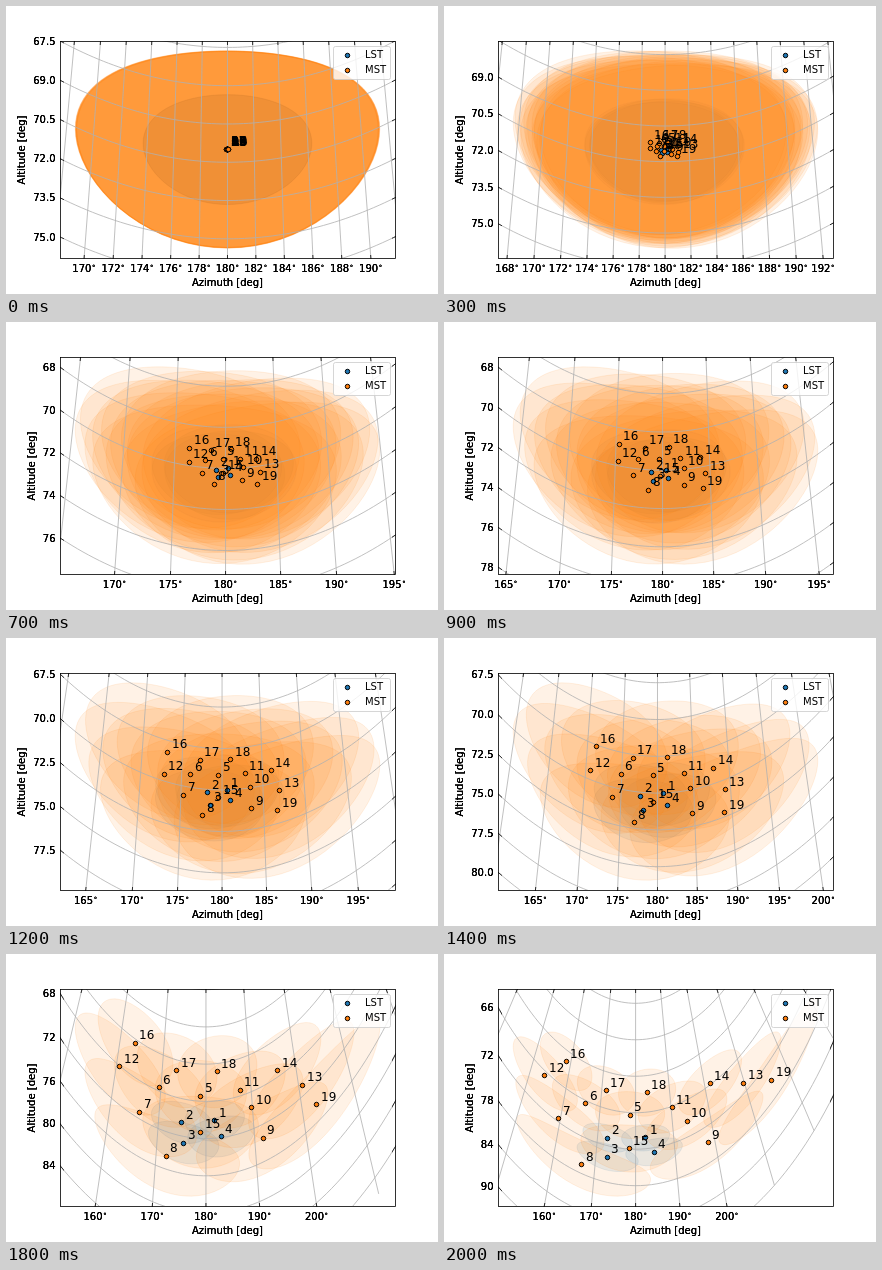
An HTML page with a canvas that plays this animation: 432 by 288 pixels, repeating every 2100 ms.

```html
<!DOCTYPE html>
<html>
<head>
<meta charset="utf-8">
<style>
html, body { margin: 0; width: 100%; height: 100%; overflow: hidden; background: #fff; }
canvas { display: block; }
</style>
</head>
<body>
<canvas id="stage" width="432" height="288"></canvas>
<script>
const ctx = document.getElementById('stage').getContext('2d');
const LEFT = 54, RIGHT = 389, TOP = 35, BOTTOM = 252, STEP_MS = 100;
const RAD = Math.PI / 180, POINTING = 70 * RAD;
const BLUE = '#1f77b4', ORANGE = '#ff7f0e';
const FONT = '"DejaVu Sans", sans-serif';

// Divergence (in thousandths) at each step
const DIVERGENCE = [.1, .5, 1, 2, 3, 4, 5, 6, 7, 8, 9, 10, 12.2, 14, 16, 18, 20, 27.5, 35, 42.5, 50];

// Telescope ground offsets [along azimuth 180, across], scaled to the largest divergence
const OFFSETS = [
  [-.004, .0157], [-.0169, -.0422], [-.0722, -.0336], [-.0507, .0242],
  [.0681, -.0111], [.0547, -.0991], [-.0464, -.1099], [-.1229, -.0512],
  [-.0988, .0809], [.0002, .0852], [.0651, .0743], [.02, -.1781],
  [-.0531, .1654], [.0497, .1553], [-.0355, -.009], [.1259, -.1833],
  [.1293, -.0725], [.14, .0288], [-.1386, .1478]
];

// Polar plane: radius is the altitude, az is measured from 180 degrees
const polar = (az, alt) => [alt * Math.sin(az * RAD), alt * Math.cos(az * RAD)];

// Circle of angular radius r on the sky around (az, alt), all in radians
function skyCircle(az, alt, r) {
  const points = [];
  for (let a = 0; a < 360; a += 4) {
    const sinAlt = Math.sin(alt) * Math.cos(r) + Math.cos(alt) * Math.sin(r) * Math.cos(a * RAD);
    const turn = Math.atan2(Math.sin(a * RAD) * Math.sin(r) * Math.cos(alt),
                            Math.cos(r) - Math.sin(alt) * sinAlt);
    points.push(polar((az + turn) / RAD, Math.asin(sinAlt) / RAD));
  }
  return points;
}

function telescope([along, across], i, spread) {
  const u = Math.cos(POINTING) + spread * along, v = spread * across;
  const alt = Math.atan2(Math.sin(POINTING), Math.hypot(u, v));
  const az = Math.atan2(v, u);
  const isLst = i < 4;
  return {
    at: polar(az / RAD, alt / RAD),
    field: skyCircle(az, alt, (isLst ? 2.15 : 3.85) * RAD),
    color: isLst ? BLUE : ORANGE
  };
}

function limits(values) {
  const lo = Math.min(...values), hi = Math.max(...values), pad = .05 * (hi - lo);
  return [lo - pad, hi + pad];
}

function multiples(lo, hi, step) {
  const out = [];
  for (let v = Math.ceil(lo / step) * step; v <= hi; v += step) out.push(v);
  return out;
}

function trace(points, toPx) {
  ctx.beginPath();
  points.forEach(p => ctx.lineTo(...toPx(p)));
}

function text(str, x, y, size, align = 'left', passes = 1) {
  ctx.font = size + 'px ' + FONT;
  ctx.textAlign = align;
  ctx.fillStyle = '#000';
  while (passes--) ctx.fillText(str, x, y);
}

// Number with a small raised ring as the degree sign
function degrees(n, x, y) {
  text(n, x - 2.2, y, 10, 'center', 3);
  text('∘', x + 7.4, y - 4, 7, 'left', 3);
}

// Markers sit on pixel centres
function dot(x, y, color) {
  ctx.beginPath();
  ctx.arc(Math.floor(x) + .5, Math.floor(y) + .5, 2.24, 0, 7);
  ctx.fillStyle = color;
  ctx.strokeStyle = '#000';
  ctx.lineWidth = 1;
  ctx.fill();
  ctx.stroke();
}

function clipped(rects, paint) {
  ctx.save();
  ctx.beginPath();
  rects.forEach(r => ctx.rect(...r));
  ctx.clip();
  paint();
  ctx.restore();
}

function strokeAll(lines, toPx, color) {
  ctx.strokeStyle = color;
  ctx.lineWidth = .8;
  lines.forEach(line => { trace(line, toPx); ctx.stroke(); });
}

function legend() {
  ctx.beginPath();
  ctx.roundRect(327.5, 40.5, 57, 33, 2);
  ctx.fillStyle = 'rgba(255,255,255,.8)';
  ctx.strokeStyle = 'rgba(204,204,204,.8)';
  ctx.lineWidth = 1;
  ctx.fill();
  ctx.stroke();
  [['LST', BLUE, 49], ['MST', ORANGE, 64]].forEach(([name, color, y]) => {
    dot(341, y, color);
    text(name, 359, y + 3, 10);
  });
}

function draw(step) {
  const spread = DIVERGENCE[step] / 50;
  const tels = OFFSETS.map((o, i) => telescope(o, i, spread));
  const edge = tels.flatMap(t => t.field);
  const [x0, x1] = limits(edge.map(p => p[0]));
  const [y0, y1] = limits(edge.map(p => p[1]));
  const W = RIGHT - LEFT, H = BOTTOM - TOP;
  const toPx = ([x, y]) => [LEFT + (x - x0) / (x1 - x0) * W, TOP + (y - y0) / (y1 - y0) * H];

  // Grid ranges and steps
  const far = Math.max(Math.hypot(x0, y1), Math.hypot(x1, y1));
  const pad = .1 * (far - y0);
  const lo = y0 - pad, hi = Math.min(90, far + pad);
  const altStep = [1, 1.5, 2, 2.5, 3, 4, 5, 6, 8, 10].find(s => (hi - lo) / s <= 9.8);
  const azLo = Math.atan2(x0, y0) / RAD, azHi = Math.atan2(x1, y0) / RAD;
  const density = (azHi - azLo) / 10;
  const azStep = density > 7 ? 10 : density > 3 ? 5 : 2;
  const alts = multiples(lo, hi, altStep), azs = multiples(azLo, azHi, azStep);
  const arcs = alts.map(alt =>
    Array.from({ length: 81 }, (_, i) => polar(azLo - 3 + (azHi - azLo + 6) * i / 80, alt)));
  const rays = azs.map(az => [polar(az, lo), polar(az, hi)]);

  ctx.fillStyle = '#fff';
  ctx.fillRect(0, 0, 432, 288);

  clipped([[LEFT, TOP, W, H]], () => {
    ctx.globalAlpha = .1;
    ctx.lineWidth = 1;
    tels.forEach(t => {
      trace(t.field, toPx);
      ctx.closePath();
      ctx.fillStyle = ctx.strokeStyle = t.color;
      ctx.fill();
      ctx.stroke();
    });
    ctx.globalAlpha = 1;
    strokeAll(arcs.concat(rays), toPx, '#b0b0b0');
    tels.forEach(t => dot(...toPx(t.at), t.color));
  });

  // Ticks follow the grid lines just inside the border
  clipped([[LEFT, TOP, 4, H], [RIGHT - 3, TOP, 4, H]], () => strokeAll(arcs, toPx, '#000'));
  clipped([[LEFT, TOP, W, 4], [LEFT, BOTTOM - 3, W, 4]], () => strokeAll(rays, toPx, '#000'));
  ctx.strokeStyle = '#000';
  ctx.lineWidth = .8;
  ctx.strokeRect(LEFT + .5, TOP + .5, W, H);

  tels.forEach((t, i) => {
    const [x, y] = toPx(t.at);
    text(i + 1, Math.round(x + 4), Math.round(y - 4), 12);
  });

  const digits = altStep % 1 ? 1 : 0;
  alts.forEach(alt => {
    const y = toPx([0, Math.sqrt(alt * alt - x0 * x0)])[1];
    if (y >= TOP - .5 && y <= BOTTOM) text(alt.toFixed(digits), 49.5, Math.round(y + 3.7), 10, 'right', 3);
  });
  azs.forEach(az => {
    const x = toPx([y1 * Math.tan(az * RAD), 0])[0];
    const drawn = y1 / Math.cos(az * RAD) <= hi;
    if (drawn && x >= LEFT && x <= RIGHT) degrees(180 + az, x, 266);
  });

  text('Azimuth [deg]', 221.5, 279.5, 10, 'center', 3);
  ctx.save();
  ctx.translate(digits ? 19 : 28.5, 144);
  ctx.rotate(-Math.PI / 2);
  text('Altitude [deg]', 0, 0, 10, 'center', 3);
  ctx.restore();
  legend();
}

let shown = -1;
function tick(now) {
  const step = Math.floor(now / STEP_MS) % DIVERGENCE.length;
  if (step !== shown) draw(shown = step);
  requestAnimationFrame(tick);
}
tick(performance.now());
</script>
</body>
</html>
```
